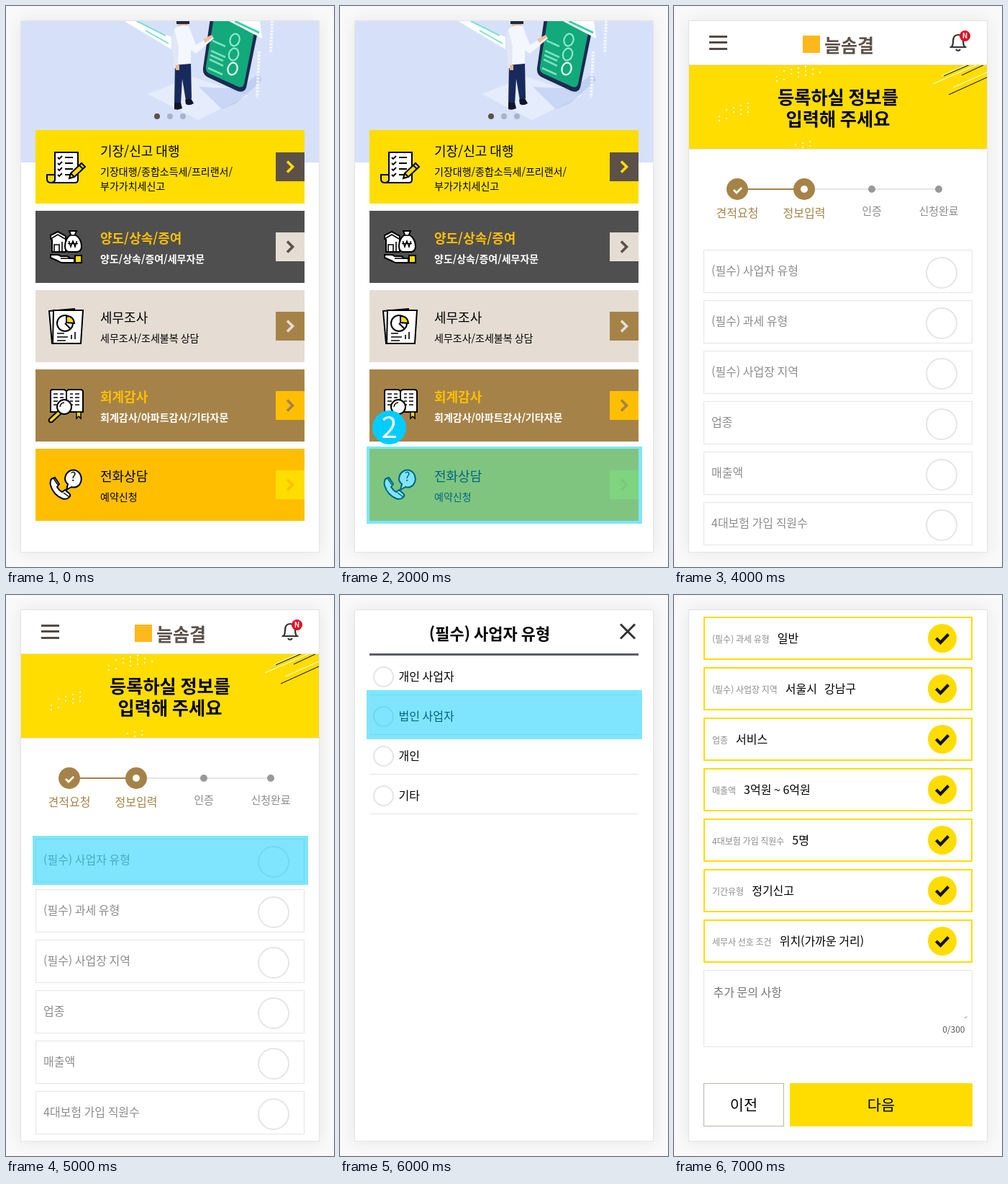
These frames come from a looping animation (456 px wide and 778 px high, 8 s). An HTML page with a canvas:

```html
<!DOCTYPE html>
<html lang="ko">
<head>
<meta charset="utf-8">
<style>
html, body { margin: 0; width: 100%; height: 100%; overflow: hidden; background: #f9f9f9; }
canvas { display: block; width: 456px; height: 778px; }
</style>
</head>
<body>
<canvas id="stage" width="456" height="778"></canvas>
<script>
const ctx = document.getElementById('stage').getContext('2d');
const FONT = '"Noto Sans CJK KR", "Noto Sans KR", "Noto Sans CJK", sans-serif';
const YELLOW = '#ffdd00', BROWN = '#a58348', AMBER = '#ffbf00', DARK = '#4f4f4f',
      SAND = '#e5ddd3', UMBER = '#5c5148', LINE = '#e5e5e5', GRAY = '#8c8c8c', CYAN = '#00ccff';

function rect(x, y, w, h, fill) {
  ctx.fillStyle = fill;
  ctx.fillRect(x, y, w, h);
}

function frame(x, y, w, h, color, lw) {
  ctx.strokeStyle = color;
  ctx.lineWidth = lw;
  ctx.strokeRect(x + lw / 2, y + lw / 2, w - lw, h - lw);
}

function disc(x, y, r, fill, stroke, lw = 2) {
  ctx.beginPath();
  ctx.arc(x, y, r, 0, Math.PI * 2);
  if (fill) { ctx.fillStyle = fill; ctx.fill(); }
  if (stroke) { ctx.strokeStyle = stroke; ctx.lineWidth = lw; ctx.stroke(); }
}

function path(d, fill, stroke = '#000', lw = 2) {
  const p = new Path2D(d);
  if (fill) { ctx.fillStyle = fill; ctx.fill(p); }
  if (stroke) { ctx.strokeStyle = stroke; ctx.lineWidth = lw; ctx.stroke(p); }
}

// y is the visual middle of the line
function text(s, x, y, size, color = '#000', weight = 500, align = 'left') {
  ctx.font = `${weight} ${size}px ${FONT}`;
  ctx.textAlign = align;
  ctx.fillStyle = color;
  ctx.fillText(s, x, y + size * 0.38);
}

function card() {
  rect(0, 0, 456, 778, '#f9f9f9');
  ctx.save();
  ctx.shadowColor = 'rgba(0,0,0,.08)';
  ctx.shadowBlur = 20;
  rect(20, 20, 416, 738, '#e4e4e4');
  ctx.restore();
  rect(21, 21, 414, 736, '#fff');
}

function overlay(y, h) {
  ctx.globalAlpha = 0.5;
  rect(37, y, 383, h, CYAN);
  ctx.globalAlpha = 1;
}

function badge(n, y) {
  disc(68.5, y, 23.5, CYAN);
  text(n, 68.5, y - 1, 40, '#fff', 500, 'center');
}

// ---- icons ----
function docIcon() {
  path('M68 203h32v38q0 4-4 4H62q6 0 6-6z', '#fff');
  path('M57 234h11v6q0 5-5.5 5t-5.5-5z', YELLOW);
  for (let y = 210; y < 238; y += 8)
    path(`M72 ${y}l2 2 4-4M82 ${y}h11`, null, '#000', 1.8);
  path('M88 239l2-7 15-14 5 5-15 14zM90 232l5 5M102 221l5 5', YELLOW);
}

function houseIcon() {
  path('M64 341V324l-2-1v-5l10-5 11 6v22z', '#fff');
  path('M62 323l10-6 10 6M67 341v-10h7v10M78 341v-14', null, '#000', 1.6);
  path('M90 317l-2-5h10l-2 5q9 6 9 16 0 8-7 8H88q-6 0-6-8 0-10 8-16z', '#fff');
  path('M89 318h8', null, '#000', 1.6);
  path('M87.500 326l2.500 8 3-8 3 8 2.500-8M86 329.500h14', null, '#000', 1.5);
  path('M62 345h9q3 0 5 2h8q4 0 4 3h7v6H79q-3 0-6-2l-11-5z', '#fff');
  path('M76 350h12', null, '#000', 1.6);
  path('M96 346h9v10h-9z', YELLOW);
}

function chartIcon() {
  path('M60 423l35-3 5 45-36 3z', '#fff');
  path('M66 422h41l-3 46H65z', '#fff');
  disc(82, 440, 11, '#fff', '#000');
  path('M84 439v-9q10 0 11 10z', YELLOW);
  path('M82 440l8 8', null);
  path('M71 454h10M71 459h15M71 464h12M96 452v10M91 456v6', null, '#000', 1.6);
}

function bookIcon() {
  path('M62 534q0-2 3-2h16l3 2 3-2h16q4 0 4 3v28H62z', '#fff');
  path('M84 534v29', null);
  for (let y = 538; y < 558; y += 5)
    path(`M66 ${y}h6m3 0h5M89 ${y}h4m3 0h6`, null, '#000', 1.6);
  path('M98 563h6v9l-3-3-3 3z', YELLOW, '#000', 1.5);
  path('M73 561l4 4-13 12q-3 1-4-1t1-4z', YELLOW);
  disc(81, 556, 10, '#fff', '#000');
  path('M75 556q1-6 6-6', null, '#000', 1.4);
}

function phoneIcon() {
  path('M62 659q0-3 3-4l3-1 6 9-3 4q3 5 7 7l4-3 7 6q1 3-2 5-4 3-9 1-12-5-16-18-1-3 0-6z', '#fff');
  path('M66 655l6 9M80 675l8 6', null, '#000', 1.4);
  path('M86 663l-2 8 7-4q6 2 11-3 5-7 1-15-5-7-13-5-7 3-8 11 0 5 4 8z', '#fff');
  text('?', 93.5, 653, 17, '#000', 500, 'center');
}

function vatIcon() {
  path('M62 418h25l9 9v30H62z', '#fff');
  path('M87 418v9h9z', YELLOW);
  text('VAT', 78.5, 432.5, 11, '#000', 700, 'center');
  path('M67 441h15M67 446h3m3 0h10M67 451h14', null, '#000', 1.8);
  path('M86 451l1-7 11-19 5 3-11 19z', '#fff');
  path('M96 428l5 3M87 444l5 3', null, '#000', 1.6);
}

function calcIcon() {
  path('M72 491h20q3 0 3 3v29q0 3-3 3H72q-2 0-2-3v-29q0-3 2-3z', '#fff');
  path('M74 495h17v7H74z', YELLOW, '#000', 1.8);
  for (let r = 0; r < 3; r++)
    for (let c = 0; c < 4; c++)
      frame(72.5 + c * 5.2, 506 + r * 6, 4.6, 4.6, '#000', 1.4);
  path('M86 512h5v11h-5z', YELLOW, '#000', 1.4);
  path('M61 500.500h6M64 497.500v6M58 513.500h6M61 510.500v6M99 493l4 4m0-4l-4 4M99 506.500h6', null, '#000', 1.6);
}

function tagIcon() {
  path('M77 574l15-3 4 28-18 2z', YELLOW);
  path('M71 570l6-7h6l7 7v25H71z', '#fff');
  path('M80 556v9', null);
  disc(80, 567, 2, '#fff', '#000', 1.6);
  path('M75.500 577l2.500 8 2.500-8 2.500 8 2.500-8M74.500 580.500h12', null, '#000', 1.5);
  path('M60 573l6 2M60 581h6M60 589l6-2M104 573l-6 2M104 581h-6M104 589l-6-2', null, '#000', 1.6);
}

function smallDoc() {
  ctx.save();
  ctx.translate(60, 350);
  ctx.scale(0.836, 0.836);
  ctx.translate(-56, -202);
  docIcon();
  ctx.restore();
}

// ---- menu screen ----
function hero() {
  ctx.save();
  ctx.beginPath();
  ctx.rect(21, 21, 414, 196);
  ctx.clip();
  rect(21, 21, 414, 196, '#d6e1f9');
  path('M197 122l62-24 78 26-70 34z', 'rgba(255,255,255,.35)', null);
  path('M268 112l56 3 28-22 4 10-36 32-20 8z', 'rgba(150,172,228,.35)', null);
  path('M166 15l64 28v17L166 22z', '#fff', null);
  path('M182 21l40 20M194 34l32 18', null, '#7fe0c8', 2);
  // device
  path('M285 10l-11 76q-1 9 7 13l41 19q9 3 12-5l17-82q2-10-4-18z', '#1c2b52', null);
  path('M290 10l-12 74q-1 7 5 10l40 18q6 2 8-4l15-76q2-10-5-18z', '#12a97b', null);
  path('M306 15h46l4 30-46-24z', '#fff', null);
  path('M318 21l34 16', null, '#38cfa7', 3);
  path('M285 62l20 9M284 68l18 8M283 74l19 9M287 48l18 8M281 86l20 9', null, '#7ee0bd', 2.5);
  for (let i = 0; i < 3; i++) {
    ctx.beginPath();
    ctx.ellipse(318 - i * 1.5, 47 + i * 20, 6.500, 8.500, 0.3, 0, 7);
    ctx.strokeStyle = i === 2 ? '#e8fff6' : '#90e8c8';
    ctx.lineWidth = 2.200;
    ctx.stroke();
  }
  // visitor
  path('M238 20h16l-3 11h-11z', '#e9b795', null);
  path('M237 18h18v7h-18z', '#22283f', null);
  path('M235 80l22-2 1 50-8 3-5-30-2 36-9-2z', '#182a5c', null);
  path('M234 32q9-8 20-4l10 26 22-13 3 4-25 21-7-5v19l-23 2z', '#f5f7ff', null);
  path('M234 32q-4 10-3 25l3 30 5-2 1-28z', '#e1e7f5', null);
  path('M236 82h5v7h-5z', '#e9b795', null);
  path('M274 46l12-6 2 3-11 8z', '#eebf9f', null);
  path('M234 134h9l2 8q-6 3-11 1zM249 130l8-2 4 7q-6 4-11 1z', '#11162b', null);
  ctx.setLineDash([3, 1.5]);
  path('M352 63l-3 64M370 20l-2 45', null, 'rgba(255,255,255,.7)', 4);
  ctx.setLineDash([]);
  ctx.restore();
  [UMBER, '#a9b2c6', '#a9b2c6'].forEach((c, i) => disc(210 + i * 18, 153, 4, c));
}

const MENU = [
  [172, 102, YELLOW, UMBER, YELLOW, '#000', '#000', docIcon, ['기장/신고 대행', '기장대행/종합소득세/프리랜서/', '부가가치세신고']],
  [284, 100, DARK, SAND, UMBER, AMBER, '#fff', houseIcon, ['양도/상속/증여', '양도/상속/증여/세무자문']],
  [394, 100, SAND, BROWN, SAND, '#000', '#000', chartIcon, ['세무조사', '세무조사/조세불복 상담']],
  [504, 100, BROWN, AMBER, BROWN, AMBER, '#fff', bookIcon, ['회계감사', '회계감사/아파트감사/기타자문']],
  [614, 100, AMBER, YELLOW, AMBER, '#000', '#000', phoneIcon, ['전화상담', '예약신청']]
];

function menu() {
  card();
  hero();
  for (const [y, h, bg, box, arrow, head, body, icon, lines] of MENU) {
    rect(41, y, 374, h, bg);
    const by = y + Math.round(h / 2) - 20;
    rect(375, by, 40, 40, box);
    path(`M391 ${by + 12.500}l7.500 7.500-7.500 7.500`, null, arrow, 3.600);
    icon();
    const top = lines.length > 2 ? y + 29 : y + 38;
    const bold = body === '#fff' ? 700 : 500;
    text(lines[0], 131, top, 18, head, bold);
    lines.slice(1).forEach((s, i) => text(s, 131, top + 28.500 + i * 20, 14, body, bold));
  }
}

// ---- form screens ----
function header() {
  for (const y of [41, 49, 58]) rect(49, y, 25, 3, '#544b45');
  rect(179, 41, 24, 24, '#ffb81c');
  text('늘솜결', 209, 54, 25, UMBER, 900);
  path('M386 57q2-3 2-8 0-9 7-9t7 9q0 5 2 8z', null, '#333', 2.200);
  path('M383.500 57h23M392 60q3 4 6 0', null, '#333', 2.200);
  disc(404.500, 41.500, 7.500, '#e60d1f');
  text('N', 404.500, 41.500, 10, '#fff', 700, 'center');
  rect(21, 81, 414, 1, LINE);
}

function dots(x, y, cols, rows, slope) {
  for (let c = 0; c < cols; c++)
    for (let r = 0; r < rows; r++)
      if ((c * 3 + r * 2) % 5) rect(x + c * 10, y + r * 6 - c * slope, 2, 2, 'rgba(255,255,255,.8)');
}

function banner(a, b) {
  ctx.save();
  ctx.beginPath();
  ctx.rect(21, 82, 414, 116);
  ctx.clip();
  rect(21, 82, 414, 116, YELLOW);
  dots(62, 146, 5, 3, 3);
  dots(142, 91, 7, 3, 2);
  dots(158, 193, 4, 2, 2);
  path('M360 108l62-27M372 97l38-17M388 113l47-21', null, '#fff', 1);
  path('M375 97l39-17M400 96l30-14M382 123l53-24', null, '#000', 1);
  ctx.restore();
  rect(21, 198, 414, 1, LINE);
  text(a, 228, 126, 25.2, '#000', 700, 'center');
  text(b, 228, 156, 25.2, '#000', 700, 'center');
}

function steps(active) {
  const xs = [88, 181, 275, 368];
  rect(88, 253, 280, 2, LINE);
  rect(88, 253, xs[active] - 88, 2, BROWN);
  ['견적요청', '정보입력', '인증', '신청완료'].forEach((s, i) => {
    const on = i <= active;
    disc(xs[i], 254, on ? 15 : 5, on ? BROWN : '#999');
    if (i === active) disc(xs[i], 254, 5, '#fff');
    if (i < active) path('M83 255l4 4 7-7', null, '#fff', 2.800);
    text(s, xs[i], on ? 287 : 284, on ? 16 : 15, on ? BROWN : GRAY, 500, 'center');
  });
}

function emptyRow(y, label, x = 52) {
  frame(41, y, 374, 60, LINE, 1);
  disc(372, y + 32, 21, '#fff', LINE);
  text(label, x, y + 29, 16, GRAY);
}

function tickedRow(y) {
  frame(41, y, 374, 60, YELLOW, 2);
  disc(373, y + 30, 20, YELLOW);
  path(`M364.500 ${y + 30}l6 6 11-11.500`, null, '#111', 4.200);
}

function answerRow(y, label, ...values) {
  tickedRow(y);
  text(label, 53, y + 31, 12, GRAY, 400);
  let x = 53 + ctx.measureText(label).width + 11;
  for (const v of values) {
    text(v, x, y + 30, 16);
    x += ctx.measureText(v).width + 10;
  }
}

function button(x, y, w, s) {
  rect(x, y, w, 60, YELLOW);
  text(s, x + w / 2, y + 30, 20.8, '#000', 500, 'center');
}

function request() {
  card();
  header();
  banner('견적 요청하실 업무를', '선택해 주세요');
  steps(0);
  tickedRow(338);
  text('기장 대행', 133.500, 368, 16);
  ['부가가치세', '종합소득세', '프리랜서'].forEach((s, i) => emptyRow(408 + i * 70, s + ' 신고 대행', 132));
  smallDoc();
  vatIcon();
  calcIcon();
  tagIcon();
  button(41, 658, 374, '다음');
}

const FIELDS = ['(필수) 사업자 유형', '(필수) 과세 유형', '(필수) 사업장 지역', '업종', '매출액', '4대보험 가입 직원수'];

function info(answered) {
  card();
  header();
  banner('등록하실 정보를', '입력해 주세요');
  steps(1);
  FIELDS.forEach((s, i) => {
    if (!i && answered) answerRow(338, s, '법인 사업자');
    else emptyRow(338 + i * 70, s);
  });
}

function choices() {
  card();
  text(FIELDS[0], 208, 54, 22, '#000', 700, 'center');
  path('M390 40.500l20 20M410 40.500l-20 20', null, '#333', 3);
  rect(41, 81, 374, 3, '#5c5c6c');
  ['개인 사업자', '법인 사업자', '개인', '기타'].forEach((s, i) => {
    const y = 113.500 + i * 55;
    disc(60.500, y, 13.500, '#fff', LINE);
    text(s, 81.500, y - 1, 16);
    rect(41, y + 24.500, 374, 1, LINE);
  });
}

function details() {
  card();
  [
    [FIELDS[1], '일반'],
    [FIELDS[2], '서울시', '강남구'],
    [FIELDS[3], '서비스'],
    [FIELDS[4], '3억원 ~ 6억원'],
    [FIELDS[5], '5명'],
    ['기간유형', '정기신고'],
    ['세무사 선호 조건', '위치(가까운 거리)']
  ].forEach((row, i) => answerRow(30 + i * 70, ...row));
  frame(41, 520, 374, 107, LINE, 1);
  text('추가 문의 사항', 54.500, 551, 16, '#757575');
  path('M404.500 587l2.500-2.500', null, '#555', 1);
  text('0/300', 404.500, 602, 12, '#555', 400, 'right');
  frame(41, 677, 112, 60, '#b5b5ad', 1);
  text('이전', 97, 707, 20.8, '#000', 500, 'center');
  button(161, 677, 254, '다음');
}

const SCENES = [
  [0, menu],
  [1000, () => { menu(); overlay(168, 109); badge('1', 144.500); }],
  [2000, () => { menu(); overlay(611, 107); badge('2', 584.500); }],
  [3000, request],
  [4000, () => info(false)],
  [5000, () => { info(false); overlay(334, 68); }],
  [5500, choices],
  [6000, () => { choices(); overlay(132, 68); }],
  [6500, () => info(true)],
  [7000, details]
];

const start = performance.now();
function tick(now) {
  const t = Math.max(0, now - start) % 8000;
  SCENES.filter(([at]) => at <= t).pop()[1]();
  requestAnimationFrame(tick);
}
requestAnimationFrame(tick);
</script>
</body>
</html>
```
